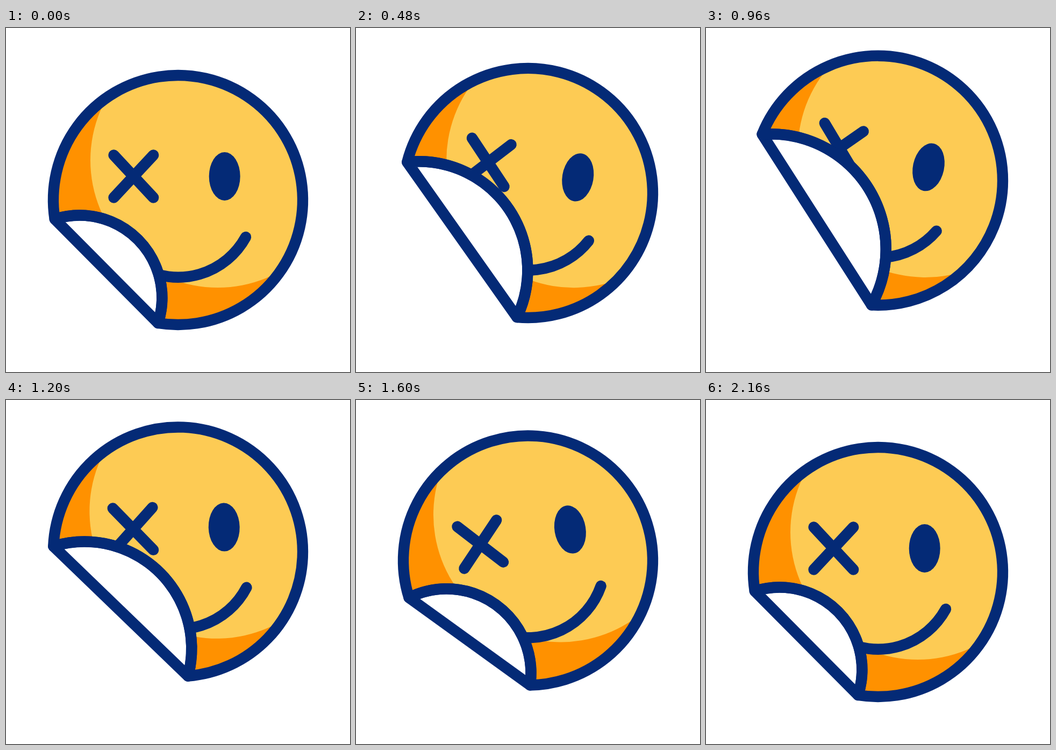
These frames come from a looping animation (640x640 px, 2240 ms). An HTML page with a canvas:

```html
<!DOCTYPE html>
<html lang="en">
<head>
<meta charset="utf-8">
<title>Peeling smiley sticker</title>
<style>
html, body { margin: 0; width: 100%; height: 100%; overflow: hidden; background: #fff; }
canvas { display: block; width: 100vw; height: 100vh; }
</style>
</head>
<body>
<canvas id="stage" width="640" height="640"></canvas>
<script>
const ctx = document.getElementById('stage').getContext('2d');
const NAVY = '#042a76', YELLOW = '#fdcb54', ORANGE = '#ff9100';
const LOOP = 2240, STEP = 40;
const RADIUS = 232, PEEL_REST = 187.7;
const rad = deg => deg * Math.PI / 180;
const AXIS = rad(135.2); // direction of the peeled corner

// Keyframes as [time, value]
const LIFT = [[40, 320], [1120, 282], [2160, 320]];
const TILT = [[40, 0], [800, 15], [1480, -10], [2160, 0]];
const PEEL = [[0, 0], [800, 56], [1720, 0]];

// cubic-bezier(.42, 0, .58, 1)
function ease(x) {
  let s = x;
  for (let i = 0; i < 6; i++) {
    s -= (((0.52 * s - 0.78) * s + 1.26) * s - x) / ((1.56 * s - 1.56) * s + 1.26);
  }
  return s * s * (3 - 2 * s);
}

function valueAt(keys, t) {
  if (t <= keys[0][0]) return keys[0][1];
  for (let i = 1; i < keys.length; i++) {
    const [t0, a] = keys[i - 1], [t1, b] = keys[i];
    if (t < t1) return a + (b - a) * ease((t - t0) / (t1 - t0));
  }
  return keys[keys.length - 1][1];
}

// Body and flap outlines, with the x axis pointing at the peeled corner
function outlines(peel) {
  const fold = PEEL_REST - peel;
  const half = Math.acos(fold / RADIUS);
  const h = RADIUS * Math.sin(half);
  const sag = 83 + 0.56 * peel;
  const r = (h * h + sag * sag) / (2 * sag);
  const cx = fold - sag + r;
  const phi = Math.atan2(h, r - sag);
  const body = new Path2D(), flap = new Path2D();
  body.arc(0, 0, RADIUS, half, 2 * Math.PI - half);
  body.arc(cx, 0, r, Math.PI + phi, Math.PI - phi, true);
  body.closePath();
  flap.arc(cx, 0, r, Math.PI - phi, Math.PI + phi);
  flap.closePath();
  return [body, flap];
}

function ellipse(x, y, rx, ry, color) {
  ctx.beginPath();
  ctx.ellipse(x, y, rx, ry, 0, 0, 2 * Math.PI);
  ctx.fillStyle = color;
  ctx.fill();
}

function drawFace() {
  ellipse(74, -74, 237, 237, YELLOW);
  ellipse(86.7, -44, 29, 45, NAVY);
  ctx.beginPath();
  ctx.moveTo(-119.5, -83.5);
  ctx.lineTo(-45.8, -4.5);
  ctx.moveTo(-45.8, -83.5);
  ctx.lineTo(-119.5, -4.5);
  ctx.stroke();
  ctx.beginPath();
  ctx.arc(0, 0, 143.7, rad(28.7), rad(151.3));
  ctx.stroke();
}

function draw(t) {
  const [body, flap] = outlines(valueAt(PEEL, t));
  ctx.setTransform(1, 0, 0, 1, 0, 0);
  ctx.fillStyle = '#fff';
  ctx.fillRect(0, 0, 640, 640);
  ctx.translate(320, valueAt(LIFT, t));
  ctx.rotate(rad(valueAt(TILT, t)) + AXIS);
  ctx.lineWidth = 20.4;
  ctx.lineCap = ctx.lineJoin = 'round';
  ctx.strokeStyle = NAVY;

  ctx.fillStyle = ORANGE;
  ctx.fill(body);
  ctx.save();
  ctx.clip(body);
  ctx.rotate(-AXIS);
  drawFace();
  ctx.restore();

  ctx.fillStyle = '#fff';
  ctx.fill(flap);
  ctx.stroke(flap);
  ctx.stroke(body);
}

const start = performance.now();
function tick() {
  const t = (performance.now() - start) % LOOP;
  draw(Math.floor(t / STEP) * STEP);
  requestAnimationFrame(tick);
}
tick();
</script>
</body>
</html>
```
